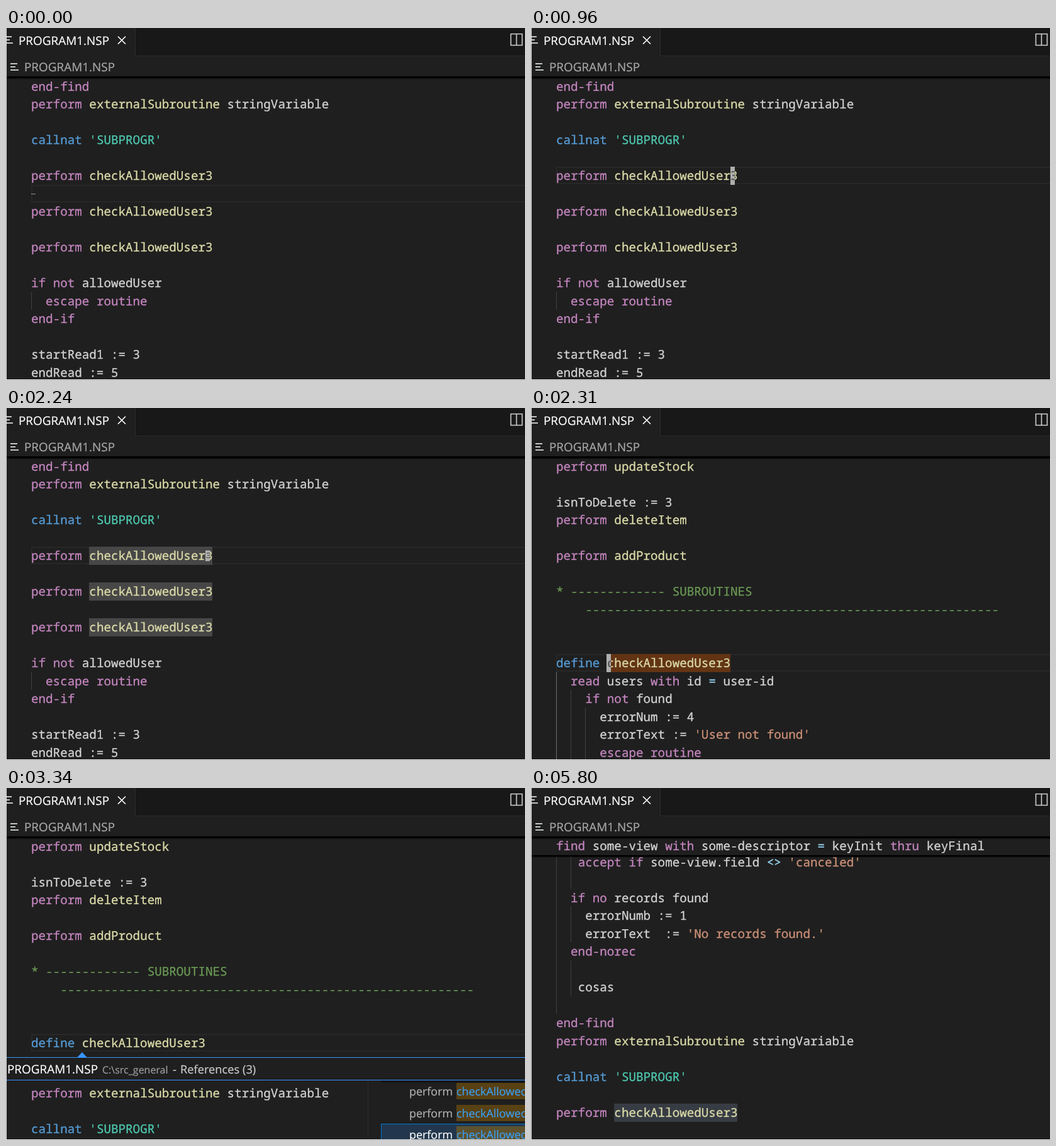
Write an HTML page that moves like this. It is 825 px wide and 561 px high and loops after 7780 ms.

```html
<!DOCTYPE html>
<html lang="en">
<head>
<meta charset="utf-8">
<title>Code navigation</title>
<style>
  html, body { margin: 0; width: 100%; height: 100%; overflow: hidden; background: #1f1f1f; }
  svg { display: block; }
  text { white-space: pre; text-rendering: geometricPrecision; }
  text, tspan { fill: currentColor; stroke: currentColor; }
  .code { font: 19.24px "Noto Sans Mono", "DejaVu Sans Mono", monospace; color: #d4d4d4; stroke-width: .3px; }
  .ui { font-family: "Open Sans", "Noto Sans", sans-serif; stroke-width: .2px; }
</style>
</head>
<body>
<svg id="stage" width="825" height="561" viewBox="0 0 825 561"></svg>
<script>
const LOOP = 7780;
const CHAR = 11.545, ROW = 28.5, LEFT = 40, TOP = 78.6;
const BG = '#1f1f1f', BLUE = '#3794ff';
const COLORS = {
  comment: '#6a9955', prog: '#4ec9b0', str: '#ce9178', key: '#c586c0',
  decl: '#569cd6', func: '#dcdcaa', op: '#9cdcfe'
};
const TOKENS = new RegExp([
  "(?<comment>^\\*.*|^-+$)",
  "(?<prog>'SUBPROGR')",
  "(?<str>'[^']*')",
  "(?<func>(?<=perform |define )\\w+)",
  "(?<key>\\b(?:end-\\w+|perform|if|not|no|escape|routine|find|with|thru|accept|read)\\b)",
  "(?<decl>\\b(?:callnat|define)\\b)",
  "(?<op><>|(?<= )=)"
].join('|'), 'g');

const colX = c => LEFT + c * CHAR;
const rowY = r => TOP + r * ROW;
const esc = s => s.replace(/</g, '&lt;').replace(/>/g, '&gt;');
const rect = (x, y, w, h, fill, more = '') =>
  `<rect x="${x}" y="${y}" width="${w}" height="${h}" fill="${fill}" ${more}/>`;
const group = (id, body) => `<g id="${id}">${body}</g>`;
const label = (x, y, s, color = '#fff', size = 18.9) =>
  `<text class="ui" x="${x}" y="${y}" style="color:${color};font-size:${size}px">${s}</text>`;

function paint(s) {
  let out = '', last = 0;
  for (const m of s.matchAll(TOKENS)) {
    const kind = Object.keys(m.groups).find(k => m.groups[k] !== undefined);
    out += esc(s.slice(last, m.index)) + `<tspan style="color:${COLORS[kind]}">${esc(m[0])}</tspan>`;
    last = m.index + m[0].length;
  }
  return out + esc(s.slice(last));
}
const codeAt = (y, col, s) =>
  `<text class="code" x="${colX(col)}" y="${Math.round(y + 21)}">${paint(s)}</text>`;

// Each line is [row, column, text].
const listing = (lines, top = TOP) =>
  lines.map(([r, c, s]) => codeAt(top + r * ROW, c, s)).join('');
const guide = (col, from, to, top = TOP, fill = '#404040') =>
  rect(Math.round(colX(col)), top + from * ROW, 1, (to - from) * ROW, fill);
const lineBox = r =>
  rect(41, Math.round(rowY(r)) + 1, 900, 26, 'none', 'stroke="#282828" stroke-width="2"');
const mark = (col, len, y, fill) =>
  rect(Math.round(colX(col)), Math.round(y), Math.round(len * CHAR), 29, fill);

const FIND = 'find some-view with some-descriptor = keyInit';
const CHECK = 'perform checkAllowedUser3';
const EXTERNAL = 'perform externalSubroutine stringVariable';
const CALL = "callnat 'SUBPROGR'";

const calls = guide(0, 12, 13) + listing([
  [0, 0, 'end-find'], [1, 0, EXTERNAL], [3, 0, CALL],
  [5, 0, CHECK], [7, 0, CHECK], [9, 0, CHECK],
  [11, 0, 'if not allowedUser'], [12, 2, 'escape routine'], [13, 0, 'end-if'],
  [15, 0, 'startRead1 := 3'], [16, 0, 'endRead := 5']
]);

const definition = listing([
  [0, 0, 'perform updateStock'], [2, 0, 'isnToDelete := 3'],
  [3, 0, 'perform deleteItem'], [5, 0, 'perform addProduct'],
  [7, 0, '* ' + '-'.repeat(13) + ' SUBROUTINES'], [8, 4, '-'.repeat(57)],
  [11, 0, 'define checkAllowedUser3']
]);

const routine =
  guide(0, 12, 17, TOP, '#707070') + guide(2, 13, 17) + guide(4, 14, 17) + listing([
    [12, 2, 'read users with id = user-id'], [13, 4, 'if not found'],
    [14, 6, 'errorNum := 4'], [15, 6, "errorText := 'User not found'"],
    [16, 6, 'escape routine']
  ]);

const LOW = 103.6;
const jumped =
  guide(0, 0, 9, LOW) + guide(2, 0, 2, LOW) + guide(2, 3, 5, LOW) + guide(2, 6, 8, LOW) +
  mark(8, 17, LOW + 14 * ROW, '#373c44') +
  listing([
    [0, 3, "accept if some-view.field <> 'canceled'"], [2, 2, 'if no records found'],
    [3, 4, 'errorNumb := 1'], [4, 4, "errorText  := 'No records found.'"],
    [5, 2, 'end-norec'], [7, 3, 'cosas'], [9, 0, 'end-find'],
    [10, 0, EXTERNAL], [12, 0, CALL], [14, 0, CHECK]
  ], LOW) +
  rect(1, 78, 824, 29, BG) + rect(1, 107, 824, 4, 'url(#shade)') +
  codeAt(77.6, 0, FIND + ' thru keyFinal');

const peekHead =
  rect(1, 429, 824, 1, BLUE) + rect(1, 465, 824, 1, BLUE) +
  `<path d="M113 429.5L121 421L129 429.5Z" fill="${BLUE}"/>` +
  label(2, 455, 'PROGRAM1.NSP') + label(153, 455, 'C:\\src_general', '#9d9d9d', 16) +
  label(265, 455, '-', '#ccc', 18.3) + label(277, 455, 'References (3)', '#ccc', 18.3) +
  rect(575, 466, 1, 94, '#2b2b2b') + rect(596, 466, 229, 4, '#161616');

function results(selected) {
  let out = '';
  for (let r = 0; r < 3; r++) {
    const y = Math.round(466.4 + r * 34.5), on = r === selected;
    if (on) out += rect(596.5, y + .5, 300, 33, '#22374d', 'stroke="#0078d4"');
    out += rect(716, y + 4, 109, 26, on ? '#5d5230' : '#584113') +
      label(641, y + 24, 'perform', on ? '#fff' : '#b4b4b4', 17.9) +
      label(716, y + 24, 'checkAllowedUser3', '#3a9ff5', 17.9);
  }
  return out;
}
const previewLast = listing([[0, 0, EXTERNAL], [2, 0, CALL]], 472.3);
const previewMiddle =
  listing([[0, 0, 'end-find'], [1, 0, EXTERNAL]], 500) +
  codeAt(466, 0, FIND) + rect(1, 500, 572, 4, 'url(#shade)');

const fileIcon = (x, y) =>
  [11, 8, 13].map((w, i) => rect(x, y + i * 5, w, 1.8, '#d4d7d6')).join('');

const chrome =
  rect(1, 0, 824, 45, '#181818') + rect(1, 44, 824, 1, '#2b2b2b') +
  rect(1, 0, 204, 45, BG) + rect(205, 0, 1, 45, '#2b2b2b') +
  rect(1, 45, 824, 33, BG) + rect(1, 77, 824, 5, 'url(#shade)') +
  fileIcon(-2, 13) + label(20, 27, 'PROGRAM1.NSP') +
  fileIcon(7, 56) + label(29, 69, 'PROGRAM1.NSP', '#a9a9a9') +
  '<path d="M178 13.5L190 25.5M190 13.5L178 25.5" stroke="#fff" stroke-width="1.7"/>' +
  '<path d="M802.5 9.5H820.5V27.5H802.5ZM811.5 9.5V27.5" fill="none" stroke="#d0d0d0" stroke-width="1.6"/>' +
  rect(0, 0, 1, 561, '#e4e4e4') + rect(0, 560, 825, 1, '#f4f4f4');

const stage = document.getElementById('stage');
stage.innerHTML =
  `<defs><linearGradient id="shade" x2="0" y2="1">
     <stop offset=".4" stop-color="#000"/><stop offset="1" stop-color="#000" stop-opacity="0"/>
   </linearGradient></defs>` +
  rect(0, 0, 825, 561, BG) +
  group('line6', lineBox(6)) + group('line5', lineBox(5)) + group('line11', lineBox(11)) +
  group('uses', [5, 7, 9].map(r => mark(8, 17, rowY(r), '#474747')).join('')) +
  group('flash', mark(7, 17, rowY(11), '#633315')) +
  group('word', mark(7, 17, rowY(11), '#474747')) +
  group('calls', calls) + group('definition', definition) + group('routine', routine) +
  group('jumped', jumped) +
  group('caret', `<svg width="7" height="29">${rect(0, 0, 7, 29, '#aeafad')}
    <text id="glyph" class="code" y="21" style="color:#515052"></text></svg>`) +
  group('peek', peekHead) +
  group('last', previewLast + results(2)) + group('middle', previewMiddle + results(1)) +
  chrome;

// Start time, visible layers, and the caret as [column, row, letter, time it starts to blink].
const STATES = [
  [0, 'calls line6', [0, 6, '', -270]],
  [960, 'calls line5', [24, 5, '3', 1570]],
  [1230, 'calls line5 uses', [24, 5, '3', 1570]],
  [2310, 'definition routine line11 flash', [7, 11, 'c', 2870]],
  [2640, 'definition routine line11 word', [7, 11, 'c', 2870]],
  [3270, 'definition line11 peek'],
  [3340, 'definition line11 peek last'],
  [4790, 'definition line11 peek middle'],
  [5800, 'jumped']
];
const LAYERS = ['line6', 'line5', 'line11', 'uses', 'flash', 'word', 'calls',
  'definition', 'routine', 'jumped', 'peek', 'last', 'middle'];
const el = id => document.getElementById(id);

// The caret moves in bursts of 70 ms ticks: [first tick, count].
const TICKS = [[0, 2], [270, 5], [820, 3], [1620, 5], [2100, 4], [2920, 7]]
  .flatMap(([t, n]) => Array.from({ length: n }, (_, i) => t + i * 70));

const ease = p => p * p * (3 - 2 * p);
function caretScale(t, start) {
  if (t < start) return 1;
  const p = (t - start) % 1000;
  if (p < 300) return 1 - ease(p / 300);
  if (p < 500) return 0;
  return p < 800 ? ease((p - 500) / 300) : 1;
}

function draw(t) {
  const [, layers, caret] = STATES.findLast(s => s[0] <= t);
  const shown = layers.split(' ');
  for (const id of LAYERS) el(id).style.display = shown.includes(id) ? '' : 'none';

  const tick = TICKS.findLast(x => x <= t);
  const scale = caret ? caretScale(tick, caret[3]) : 0;
  el('caret').style.display = scale > 0 ? '' : 'none';
  if (!scale) return;
  const [col, row, letter] = caret;
  const x = Math.floor(colX(col)), y = Math.round(rowY(row)) + 14.5 * (1 - scale);
  el('caret').setAttribute('transform', `translate(${x} ${y}) scale(1 ${scale})`);
  el('glyph').setAttribute('x', colX(col) - x);
  el('glyph').textContent = letter;
}

const began = performance.now();
function frame() {
  draw((performance.now() - began) % LOOP);
  requestAnimationFrame(frame);
}
frame();
</script>
</body>
</html>
```
